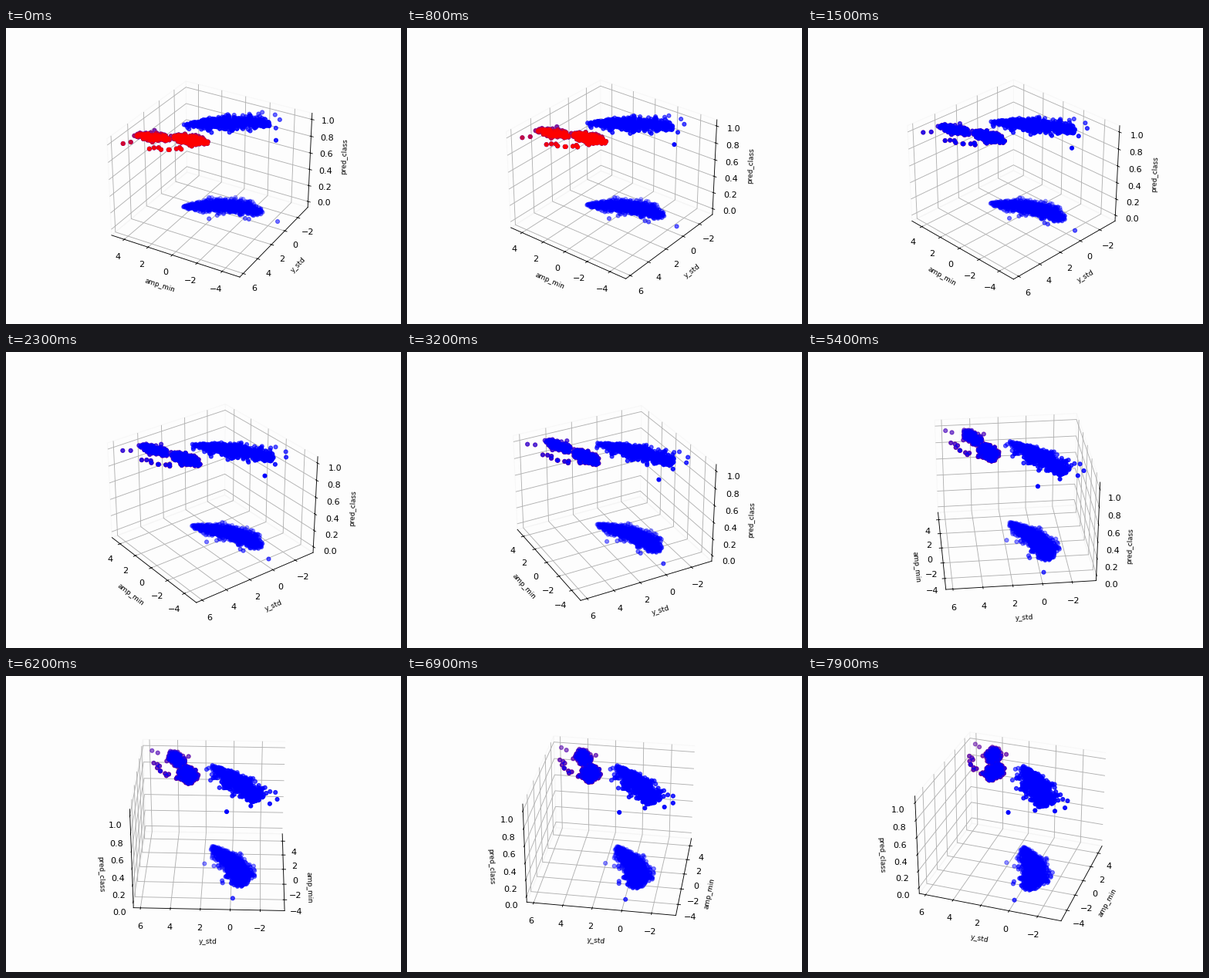
A matplotlib script for the animation above (8 s loop, 512 px wide and 384 px high).

```python
import numpy as np
import matplotlib.pyplot as plt
from matplotlib.animation import FuncAnimation

FRAMES, STEP_MS = 80, 100
ELEV, AZIM = 30, 120
PAPER = "#fdfdfd"

rng = np.random.default_rng(7)


def blob(n, start, end, bend, width):
    """Soft leaf-shaped cloud along a bowed line from start to end."""
    u = rng.beta(1.8, 1.9, n)
    x, y = np.outer(u, end).T + np.outer(1 - u, start).T
    swell = width * np.sin(np.pi * u) ** 0.6
    return np.column_stack([x, y + 4 * bend * u * (1 - u)
                            + swell * rng.normal(0, 0.39, n)])


def strays(n, start, end, spread):
    """Loose points scattered around a straight line."""
    line = np.linspace(start, end, n)
    return line + rng.normal(0, spread, line.shape)


def at_level(points, z):
    return np.column_stack([points, np.full(len(points), z)])


floor = np.vstack([
    blob(1000, (2.3, 1.45), (-3.25, -0.5), -0.7, 1.3),
    [(-4.69, -0.15), (-2.46, 0.62), (-2.75, 0.58)],
])
roof = np.vstack([
    blob(750, (2.1, 1.45), (-3.3, -1.5), -0.4, 1.35),
    strays(5, (-1.7, -2.85), (-3.4, -1.1), 0.2),
    [(-4.6, 0.3), (-3.41, -2.48), (-2.77, -2.97)],
])
flagged = np.vstack([
    blob(130, (4.4, 4.3), (1.6, 3.65), 0, 0.75),
    blob(170, (2, 3.2), (-0.8, 2.9), 0.03, 0.9),
    strays(9, (0.2, 4.4), (2.4, 5.5), 0.12),
    [(4.27, 5.77), (3.93, 5.34)],
])
cloud = np.vstack([at_level(floor, 0), at_level(roof, 1), at_level(flagged, 1)])

fig = plt.figure(figsize=(6.4, 4.8), dpi=80, facecolor=PAPER)
ax = fig.add_subplot(111, projection="3d", facecolor=PAPER)

ax.scatter(*cloud.T, c="blue")
# A hair higher, so red wins whenever both sets share the nearest point.
ax.scatter(*at_level(flagged, 1 + 1e-6).T, c="red")

ax.set(xlim=(-5.365, 5.085), ylim=(-3.62, 6.47), zlim=(-0.0729, 1.0729),
       xticks=range(-4, 5, 2), yticks=range(-2, 7, 2),
       zticks=np.linspace(0, 1, 6))
ax.set_xlabel("amp_min", fontsize=8)
ax.set_ylabel("y_std", fontsize=8)
ax.set_zlabel("pred_class", fontsize=8)

for axis in (ax.xaxis, ax.yaxis, ax.zaxis):
    axis.pane.set_fill(False)
    axis.pane.set_edgecolor("#f2f2f2")


def turn(i):
    ax.view_init(elev=ELEV, azim=AZIM + i)
    return ()


anim = FuncAnimation(fig, turn, frames=FRAMES, interval=STEP_MS,
                     repeat=True, repeat_delay=0)
plt.show()
```
